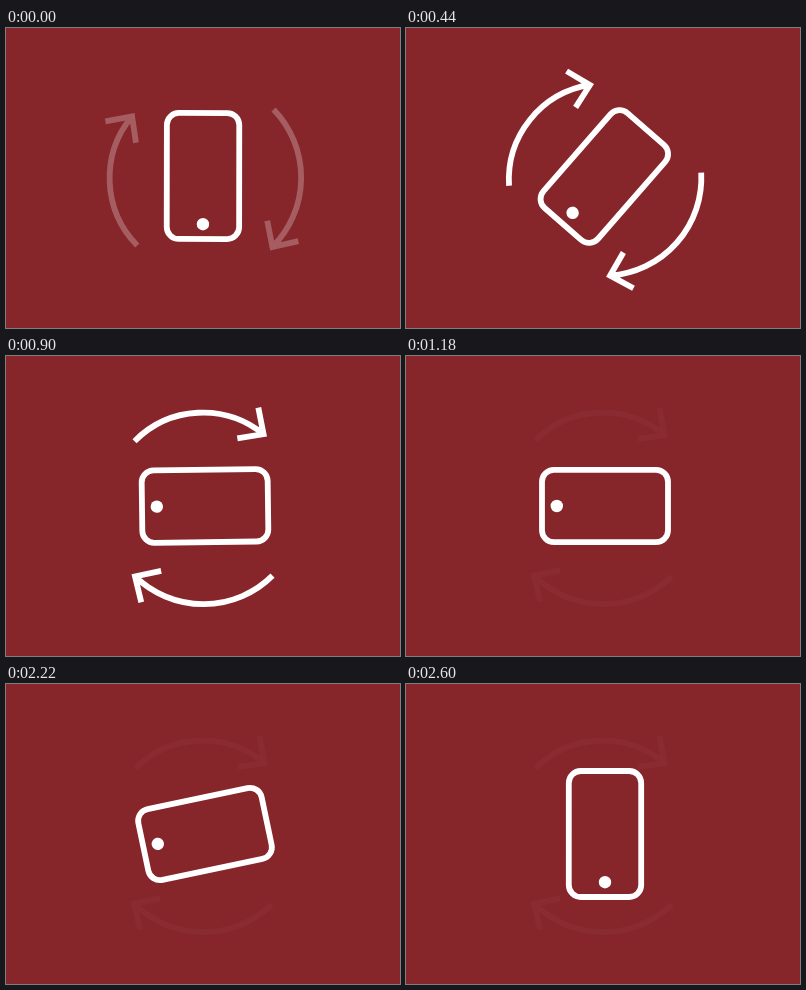
Recreate the animation shown at these times as an HTML page. Size 394 px wide and 300 px high, loop 3.22 s.

```html
<!DOCTYPE html>
<html lang="en">
<head>
<meta charset="utf-8">
<title>Rotate device</title>
<style>
  html, body { margin: 0; height: 100%; overflow: hidden; background: #86262b; }
  svg { display: block; }
  path, rect { fill: none; stroke: #fff; stroke-width: 5.8; }
  circle { fill: #fff; }
</style>
</head>
<body>
<svg width="394" height="300" viewBox="0 0 394 300">
  <g id="arrows">
    <path d="M131.3 217.6A96 96 0 0 1 126 88.5M99.3 93.4L126 88.5L129.9 114.8"/>
    <path d="M267.5 81.4A98 98 0 0 1 266.5 218.9M261.3 192.7L266.5 218.9L292.4 213"/>
  </g>
  <g id="phone">
    <rect x="-36.2" y="-63" width="72.4" height="126" rx="12"/>
    <circle cy="48.2" r="6.2"/>
  </g>
</svg>
<script>
  const LOOP = 3220;
  const arrows = document.getElementById('arrows');
  const phone = document.getElementById('phone');

  const progress = (t, start, length) => Math.min(1, Math.max(0, (t - start) / length));
  const smooth = s => s * s * (3 - 2 * s);

  // cubic-bezier(.67, 0, .67, 1): slow start, quick finish
  function lateEase(x) {
    let s = x;
    for (let i = 0; i < 8; i++) {
      s -= (2 * s * (1 - s) + s ** 3 - x) / (2 - 4 * s + 3 * s * s);
    }
    return smooth(s);
  }

  function draw(t) {
    const turn = 90 * smooth(progress(t, -15, 968));
    const back = 90 * (1 - lateEase(progress(t, 2003, 600)));
    const fadeIn = progress(t, -50, 200);
    const fadeOut = 1 - progress(t, 980, 205);

    arrows.setAttribute('transform', `rotate(${turn} 197 150)`);
    arrows.setAttribute('opacity', Math.max(0.025, Math.min(fadeIn, fadeOut)));
    phone.setAttribute('transform', t < 2000
      ? `rotate(${turn} 197 150) translate(197 148)`
      : `translate(199 150) rotate(${back})`);
  }

  const begin = performance.now();
  function tick() {
    draw((performance.now() - begin) % LOOP);
    requestAnimationFrame(tick);
  }
  tick();
</script>
</body>
</html>
```
